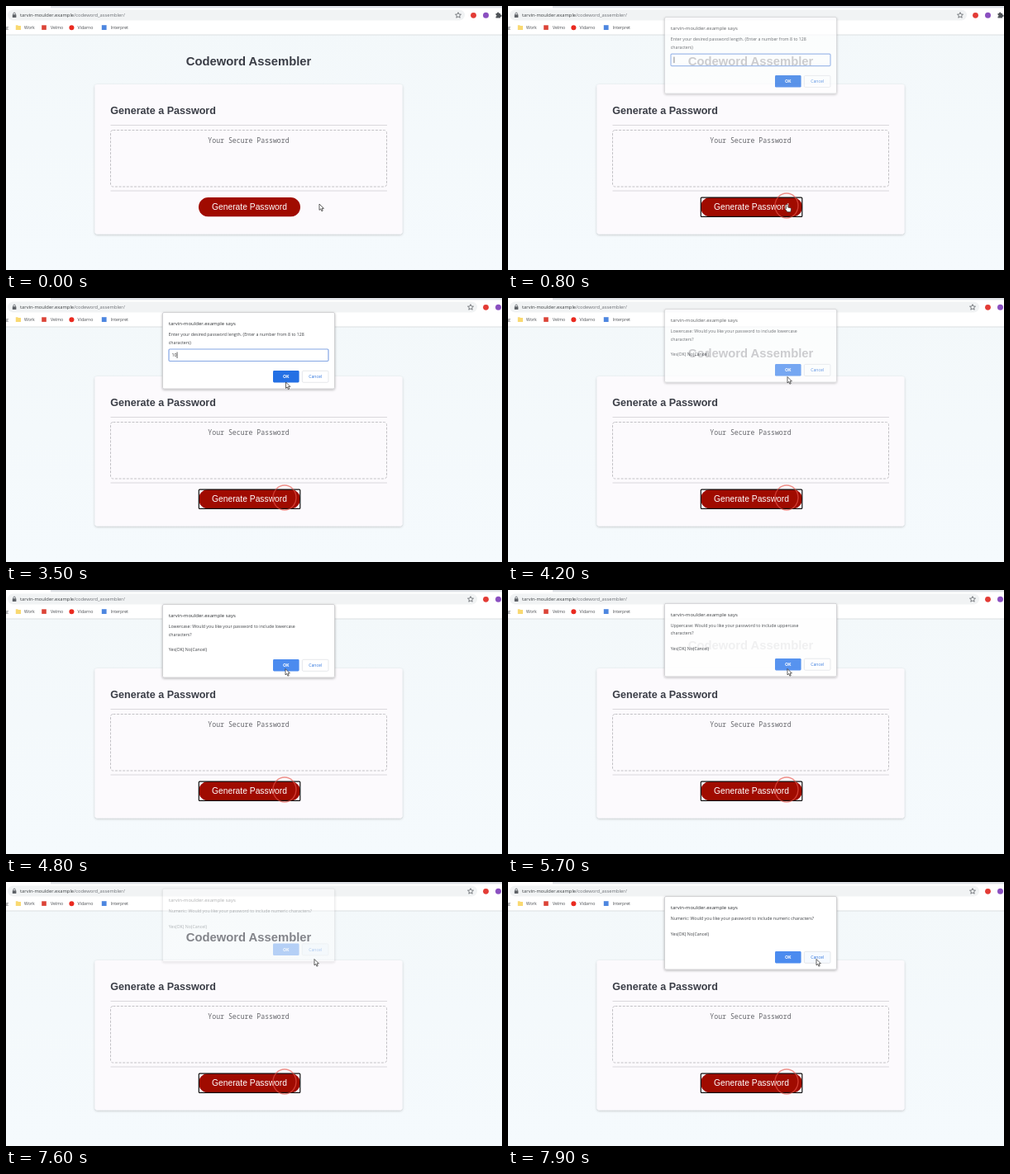
These frames come from a looping animation (600 by 320 pixels, 8 s). An HTML page:

```html
<!DOCTYPE html>
<html lang="en">
<head>
<meta charset="utf-8">
<title>Codeword Assembler</title>
<style>
html, body { margin: 0; width: 100%; height: 100%; overflow: hidden; background: #f4f9fb; }
svg { display: block; }
text { font-family: "Open Sans", "Noto Sans", sans-serif; white-space: pre; }
.arial { font-family: "Liberation Sans", Arial, sans-serif; }
.bold { font-weight: 700; }
.mono { font-family: "Noto Sans Mono", "DejaVu Sans Mono", monospace; }
</style>
</head>
<body>
<svg id="stage" width="600" height="320" viewBox="0 0 600 320">
  <defs>
    <linearGradient id="sky" x2="0" y2="1">
      <stop offset="0" stop-color="#f3f8fa"/><stop offset="1" stop-color="#f5fafd"/>
    </linearGradient>
    <filter id="soft" x="-10%" y="-10%" width="120%" height="130%">
      <feDropShadow dx="0" dy="1" stdDeviation="1.8" flood-color="#000" flood-opacity=".22"/>
    </filter>
    <filter id="lift" x="-10%" y="-20%" width="120%" height="150%">
      <feDropShadow dx="0" dy="1" stdDeviation="1.5" flood-color="#000" flood-opacity=".3"/>
    </filter>
  </defs>

  <rect width="600" height="320" fill="url(#sky)"/>
  <rect width="600" height="35" fill="#fff"/>
  <rect x="54" width="546" height="2.4" fill="#dee1e6"/>
  <rect y="34.5" width="600" height="1" fill="#dcdfe2"/>
  <rect id="pill" x="2" y="4.5" width="553" height="13" rx="6.5" fill="#f1f3f4"/>
  <g fill="#5f6368">
    <rect x="7.8" y="10.3" width="4.6" height="3.8" rx=".5"/>
    <path d="M8.8 10.5V9.4a1.3 1.3 0 0 1 2.6 0v1.1" fill="none" stroke="#5f6368" stroke-width=".8"/>
  </g>
  <text x="17" y="13.3" font-size="5.8" fill="#3c4043">tarvin-moulder.example<tspan fill="#6b6f74">/codeword_assembler/</tspan></text>

  <g id="tools">
    <path d="M547 7.7l1 2.3 2.5.2-1.9 1.6.6 2.4-2.2-1.3-2.2 1.3.6-2.4-1.9-1.6 2.5-.2z" fill="none" stroke="#5f6368" stroke-width=".8"/>
    <circle cx="565.5" cy="11.3" r="3.4" fill="#e33b35"/>
    <circle cx="580.5" cy="11.3" r="3.5" fill="#8a4fc0"/>
    <path d="M592.5 9h1.6a1.2 1.2 0 1 1 2.3 0h1.7v1.7a1.2 1.2 0 1 1 0 2.3v1.6h-5.6v-1.8a1 1 0 1 0 0-2z" fill="#4f5358"/>
  </g>

  <g font-size="5.2" fill="#4a4d51">
    <text x="0" y="28">g</text>
    <path d="M11.8 23.2h2.4l.8.9h3v5h-6.2z" fill="#f9d971"/>
    <text x="22" y="28">Work</text>
    <rect x="43.2" y="23.3" width="5.6" height="5.6" fill="#dc4437"/>
    <text x="54" y="28">Velmo</text>
    <circle cx="79.4" cy="26.2" r="3" fill="#ea2a20"/>
    <text x="86.5" y="28">Vidarno</text>
    <rect x="115.8" y="23.2" width="5.8" height="5.8" fill="#4d86e0"/>
    <text x="126.5" y="28">Interpret</text>
  </g>

  <text class="arial bold" x="293.5" y="72.3" font-size="14.8" text-anchor="middle" fill="#3a3d46">Codeword Assembler</text>
  <rect x="107.5" y="95" width="372" height="181.5" rx="3" fill="#fcfafd" filter="url(#soft)"/>
  <text class="arial bold" x="126.3" y="131" font-size="12.55" fill="#3a3d46">Generate a Password</text>
  <path d="M126.5 144.5h334.5M126.5 224h334.5" stroke="#dad8dc"/>
  <rect x="126.5" y="150.5" width="334" height="68.5" rx="3" fill="none" stroke="#c3c2c6" stroke-dasharray="3 1.6"/>
  <text class="mono" x="293.5" y="166" font-size="8.2" text-anchor="middle" fill="#66676c">Your Secure Password</text>
  <rect x="233" y="232" width="123" height="23.3" rx="11.6" fill="#a00b00"/>
  <text class="arial" x="294.5" y="247.2" font-size="10.3" text-anchor="middle" fill="#fff">Generate Password</text>
  <g id="focus">
    <rect x="233.3" y="232.2" width="122.5" height="23.2" rx="1" fill="none" stroke="#111" stroke-width="1.2"/>
    <ellipse cx="337" cy="242" rx="14" ry="15" fill="none" stroke="#e8544a" stroke-opacity=".65" stroke-width="1.4"/>
  </g>

  <g id="dialog">
    <rect id="panel" x="189.5" y="17.5" width="208" fill="#fff" stroke="#c9cacc" stroke-width=".8" rx="1.5" filter="url(#lift)"/>
    <text x="196.8" y="33" font-size="6" fill="#2b2e31">tarvin-moulder.example says</text>
    <g id="lines" font-size="5.25" fill="#3f4246"></g>
    <g id="field">
      <rect x="197" y="62" width="193" height="14.5" rx="1.2" fill="#fff" stroke="#84a6e4" stroke-width="1.2"/>
      <text id="typed" x="200.6" y="71.2" font-size="5.3" fill="#333"></text>
      <rect id="caret" y="65.5" width=".7" height="7.5" fill="#222"/>
    </g>
    <g id="buttons" font-size="5.2" text-anchor="middle">
      <rect id="ok" x="323" y="0" width="31.6" height="14.5" rx="1.4"/>
      <text class="bold" x="338.7" y="9.1" fill="#fff">OK</text>
      <rect id="cancel" x="358.4" y=".3" width="31.6" height="14" rx="1.4" stroke="#dcdfe3" stroke-width=".7"/>
      <text x="374.2" y="9.1" fill="#2f75dd">Cancel</text>
    </g>
  </g>

  <g id="cursor" stroke="#222" stroke-width=".7" fill="#fff" stroke-linejoin="round">
    <path id="arrow" d="M0 0v7.4l1.7-1.5 1.2 2.8 1.3-.6-1.2-2.7h2.4z"/>
    <path id="hand" d="M1 0c.9 0 1.1.5 1.1 1.1v2.5l3 .7c.8.2 1 .7.9 1.5l-.6 3.4H1.5L-1 6c-.4-.8.2-1.3.9-.8V1.1C-.1.5.2 0 1 0z"/>
  </g>
</svg>
<script>
const LOOP = 8000, STEP = 100;
const $ = id => document.getElementById(id);
const set = (id, attrs) => { for (const k in attrs) $(id).setAttribute(k, attrs[k]); };
const show = (id, on) => { $(id).style.display = on ? '' : 'none'; };
const move = (id, x, y) => set(id, { transform: `matrix(1 0 0 1 ${x} ${y})` });
const clamp = v => Math.max(0, Math.min(1, v));

const ask = 'Yes(OK) No(Cancel)';
// Text lines are [baseline, text].
const dialogs = [
  { open: 600, close: 3900, prompt: true, lines: [
    [46, 'Enter your desired password length. (Enter a number from 8 to 128'], [55.5, 'characters)']] },
  { open: 4000, close: 5300, lines: [
    [46, 'Lowercase: Would you like your password to include lowercase'], [55.5, 'characters?'], [74.3, ask]] },
  { open: 5450, close: 7100, lines: [
    [46, 'Uppercase: Would you like your password to include uppercase'], [55.5, 'characters?'], [74.3, ask]] },
  { open: 7500, close: 9000, lines: [
    [46, 'Numeric: Would you like your password to include numeric characters?'], [65, ask]] }
];
// Pointer tip: time, x, y
const path = [
  [0, 379, 240], [100, 379, 240], [500, 336.5, 240.5], [2450, 336.5, 240.5],
  [3300, 338.5, 102], [3500, 338.5, 102], [3700, 338, 95.5],
  [6050, 338, 95.5], [6600, 368, 93.5], [6900, 373, 93.5], [LOOP, 373, 93.5]
];

function pointer(t) {
  const i = path.findIndex((p, n) => t >= p[0] && t < path[n + 1][0]);
  const [a, b] = [path[i], path[i + 1]];
  const u = (t - a[0]) / (b[0] - a[0]), e = u * u * (3 - 2 * u);
  return [a[1] + (b[1] - a[1]) * e, a[2] + (b[2] - a[2]) * e];
}

let current;
function fill(d) {
  if (d === current) return;
  current = d;
  $('lines').innerHTML = d.lines.map(([y, s]) => `<text x="196.8" y="${y}">${s}</text>`).join('');
  set('panel', { height: d.prompt ? 92.5 : 88.5 });
  move('buttons', 0, d.prompt ? 88 : 84);
  show('field', d.prompt);
}

function render(t) {
  const [x, y] = pointer(t), hand = t >= 300 && t < 2500;
  move('cursor', x, y);
  show('hand', hand);
  show('arrow', !hand);
  show('focus', t >= 600);

  const shift = t >= 2300 ? 15 : 0;
  move('tools', shift, 0);
  set('pill', { width: 553 + shift });

  const d = dialogs.find(d => t > d.open && t < d.close + 150);
  show('dialog', d);
  if (!d) return;
  fill(d);
  const rise = clamp((t - d.open) / 270);
  const fade = 1 - clamp((t - d.close) / 150);
  set('dialog', { opacity: rise * fade });
  move('dialog', 0, -15 * (1 - rise));

  const onOk = x < 355 && y > 88 && y < 102;
  const onCancel = x > 358 && y < 99;
  set('ok', { fill: !d.prompt || onOk ? '#4b8bef' : '#2470e4' });
  set('cancel', { fill: onCancel ? '#f6faff' : '#fff' });

  const typed = t < 2000 ? '' : t < 2300 ? '1' : '10';
  $('typed').textContent = typed;
  set('caret', { x: 200.6 + 3.03 * typed.length });
  const since = t < 2000 ? t - 700 : t - 2300;
  show('caret', since < 0 || since % 1000 < 500 || (t >= 3400 && t < 3700));
}

function tick(now) {
  render(Math.floor((now % LOOP) / STEP) * STEP);
  requestAnimationFrame(tick);
}
tick(performance.now());
</script>
</body>
</html>
```
